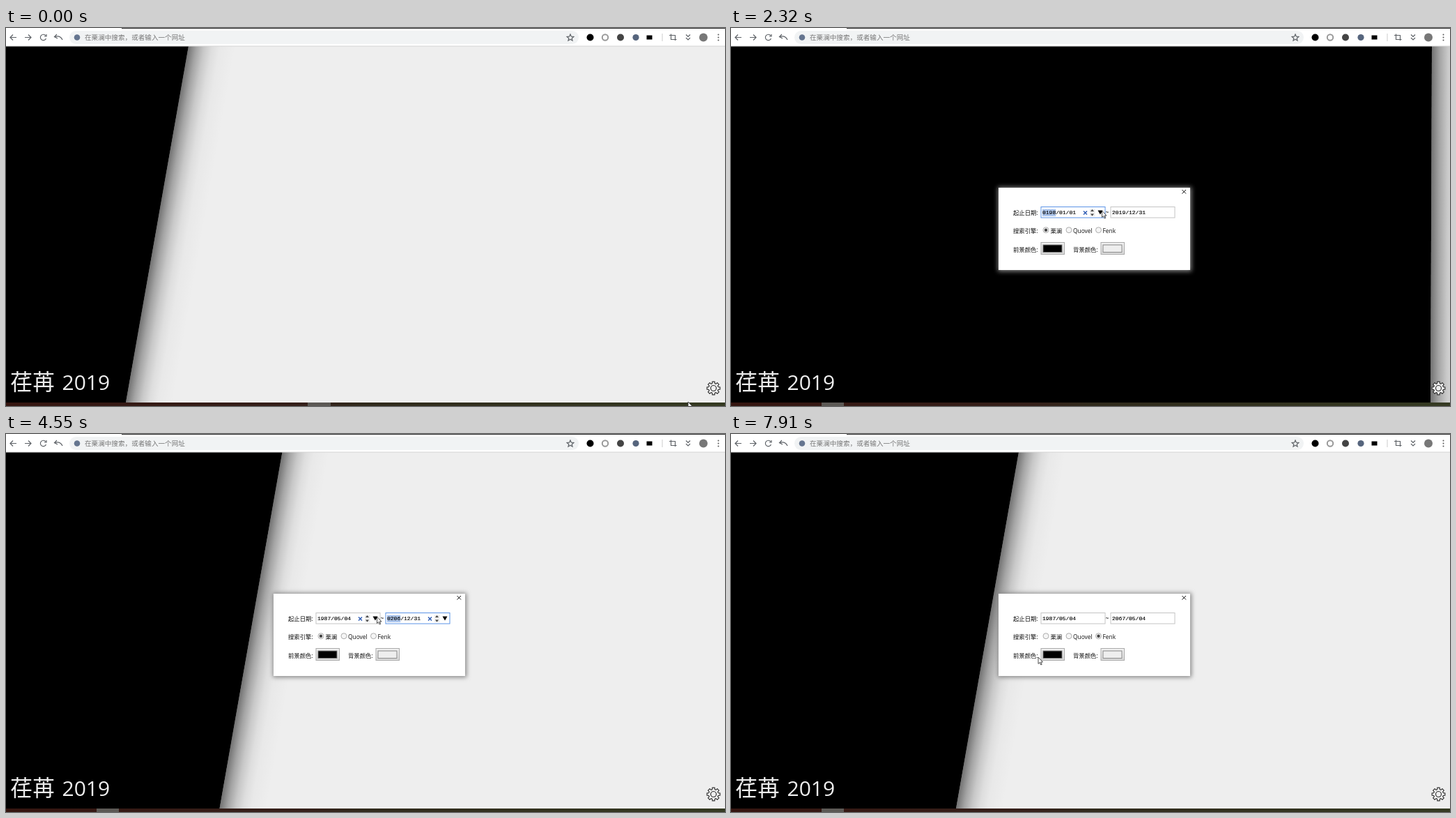
Recreate the animation shown at these times as an HTML page. Size 1032 px wide and 542 px high, loop 7990 ms.

```html
<!DOCTYPE html>
<html lang="zh">
<head>
<meta charset="utf-8">
<style>
  html, body { margin: 0; width: 100%; height: 100%; overflow: hidden; background: #eee; }
  svg { display: block; width: 1032px; height: 542px; }
  text { font-family: "Open Sans", "Noto Sans CJK SC", "Noto Sans CJK", sans-serif; white-space: pre; }
  .label { font-size: 8.4px; font-weight: 500; fill: #111; }
  .date { font: 8px "Liberation Mono", monospace; fill: #000; stroke: #000; stroke-width: .15; }
  .icon { fill: none; stroke: #5f6368; stroke-width: 1.2; }
</style>
</head>
<body>
<svg viewBox="0 0 1032 542">
  <defs>
    <linearGradient id="shade">
      <stop offset="0" stop-opacity=".52"/><stop offset=".167" stop-opacity=".31"/>
      <stop offset=".333" stop-opacity=".16"/><stop offset=".5" stop-opacity=".067"/>
      <stop offset=".667" stop-opacity=".023"/><stop offset="1" stop-opacity="0"/>
    </linearGradient>
    <linearGradient id="task">
      <stop stop-color="#351510"/><stop offset=".42" stop-color="#35201a"/>
      <stop offset=".5" stop-color="#302a1c"/><stop offset="1" stop-color="#353a22"/>
    </linearGradient>
    <linearGradient id="button" x2="0" y2="1">
      <stop stop-color="#f2f2f2"/><stop offset="1" stop-color="#d9d9d9"/>
    </linearGradient>
    <filter id="blur" x="-20%" y="-20%" width="140%" height="140%"><feGaussianBlur stdDeviation="3"/></filter>
  </defs>

  <rect width="1032" height="542" fill="#eee"/>
  <g id="panel">
    <rect x="-1300" width="1300" height="511"/>
    <rect width="68" height="511" fill="url(#shade)"/>
  </g>
  <text x="6" y="519" font-size="32" fill="#eee">荏苒</text>
  <text x="80.500" y="519" font-size="30" fill="#eee">2019</text>
  <path id="gear" fill="#f4f4f4" stroke="#333" stroke-width="1.2" stroke-linejoin="round"/>
  <circle cx="1015.500" cy="516.500" r="4" fill="#eee" stroke="#333" stroke-width="1.200"/>

  <g id="toolbar">
    <rect width="1032" height="26" fill="#fff"/>
    <path d="M166 .5H1032" stroke="#333"/>
    <path d="M0 26H1032" stroke="#d4d4d4"/>
    <rect x="91" y="4" width="731" height="19" rx="9.500" fill="#f1f3f4"/>
    <path class="icon" d="M15 13.500H6M10 9.500L6 13.500L10 17.500M27 13.500H36M32 9.500L36 13.500L32 17.500M57 11A4.200 4.200 0 1 0 57.500 15M58 9V12H55M70 12.500Q78 10 81 17M73 9L69.500 12.500L74 15"/>
    <circle cx="102" cy="13.500" r="4.300" fill="#65758f"/>
    <text x="113" y="17" font-size="9.600" fill="#777">在栗澜中搜索，或者输入一个网址</text>
    <path class="icon" stroke-width="1" d="M810 9L811.400 12.200L814.800 12.500L812.200 14.700L813 18L810 16.200L807 18L807.800 14.700L805.200 12.500L808.600 12.200Z"/>
    <circle cx="838.500" cy="13.500" r="5"/>
    <circle cx="860" cy="13.500" r="4.200" fill="none" stroke="#999" stroke-width="2"/>
    <circle cx="882" cy="13.500" r="5" fill="#444"/>
    <circle cx="904" cy="13.500" r="4.600" fill="#56657d"/>
    <rect x="919.500" y="10.500" width="8" height="6"/>
    <path d="M942 8V19" stroke="#ccc"/>
    <path class="icon" d="M952 10.500H960.500V18M954.500 8.500V16.500H962.500M976 9.500L979 12.500L982 9.500M976 14L979 17L982 14"/>
    <circle cx="1001" cy="13.500" r="6" fill="#777"/>
    <path d="M1022.500 9.500v.1m0 3.900v.1m0 3.900v.1" stroke="#555" stroke-width="2" stroke-linecap="round"/>
  </g>

  <rect y="537" width="1032" height="5" fill="url(#task)"/>
  <rect id="task-tab" y="537" height="5" fill="#5c5955"/>
  <text x="966" y="546.500" font-size="8" fill="#fff">18:41</text>

  <g id="dialog">
    <rect x="383" y="228" width="278" height="121" fill="#858585" filter="url(#blur)"/>
    <rect x="384" y="229" width="275" height="118" fill="#fff"/>
    <path d="M647.500 232l5.500 5.500m0-5.500l-5.500 5.500" stroke="#111"/>
    <g class="label">
      <text x="405" y="267.500">起止日期:</text><text x="537.500" y="267">~</text>
      <text x="405" y="294">搜索引擎:</text>
      <text x="458.500" y="294">栗澜</text><text x="491" y="294">Quovel</text><text x="533.500" y="294">Fenk</text>
      <text x="405" y="320.500">前景颜色:</text><text x="491" y="320.500">背景颜色:</text>
    </g>
    <g id="fields"></g>
    <g fill="#f5f5f5" stroke="#999" stroke-width=".8">
      <circle cx="452" cy="289.700" r="4"/><circle cx="485" cy="289.700" r="4"/><circle cx="527.500" cy="289.700" r="4"/>
    </g>
    <circle id="choice" cy="289.700" r="2.200" fill="#444"/>
    <g stroke="#aaa">
      <rect x="445" y="307.500" width="33.500" height="17" fill="url(#button)"/>
      <rect x="531" y="307.500" width="33.500" height="17" fill="url(#button)"/>
      <rect x="448" y="311" width="27" height="10.500" fill="#000" stroke="#777"/>
      <rect x="534" y="311" width="27" height="10.500" fill="#eee" stroke="#888"/>
    </g>
  </g>
  <path id="cursor" d="M0 0V9.500L2.200 7.500L3.800 11L5.200 10.400L3.700 7H6.500Z" fill="#fff" stroke="#222" stroke-width=".8"/>
</svg>
<script>
const LOOP = 7990, OPEN = 450, CLICK = 6900;
const $ = id => document.getElementById(id);
const set = (el, attrs) => { for (const k in attrs) el.setAttribute(k, attrs[k]); };
const show = (el, on) => set(el, { visibility: on ? 'inherit' : 'hidden' });

// Top x of the panel's slanted edge: [time, x]
const edgeKeys = [[0, 262], [1720, 262], [1850, 974], [2150, 1006], [2600, 1006], [2850, 988], [3870, 988],
  [3960, 732], [4170, 732], [4600, 384], [4980, 386], [5120, 410], [5600, 410], [5800, 405], [5840, 405], [6200, 413]];
const cursorKeys = [[0, 979, 536], [70, 979, 536], [350, 1014, 515], [500, 1014, 515], [830, 632, 320], [1150, 532.5, 262],
  [6050, 532.5, 262], [6600, 526, 288], [7200, 525, 290], [7520, 521, 296], [7870, 441, 320]];
// Typing: [time, start date, end date, focused field, selected part]
const edits = [
  [0, '2019/01/01', '2019/12/31', -1, 0],
  [1200, '2019/01/01', '2019/12/31', 0, 0],
  [1770, '0001/01/01', '2019/12/31', 0, 0],
  [2000, '0019/01/01', '2019/12/31', 0, 0],
  [2200, '0198/01/01', '2019/12/31', 0, 0],
  [2400, '1987/01/01', '2019/12/31', 0, 1],
  [2570, '1987/00/01', '2019/12/31', 0, 1],
  [2760, '1987/05/01', '2019/12/31', 0, 2],
  [3120, '1987/05/00', '2019/12/31', 0, 2],
  [3370, '1987/05/04', '2019/12/31', 0, 2],
  [3650, '1987/05/04', '2019/12/31', 1, 0],
  [3880, '1987/05/04', '0002/12/31', 1, 0],
  [4220, '1987/05/04', '0020/12/31', 1, 0],
  [4400, '1987/05/04', '0206/12/31', 1, 0],
  [4600, '1987/05/04', '2067/12/31', 1, 1],
  [5050, '1987/05/04', '2067/00/31', 1, 1],
  [5320, '1987/05/04', '2067/05/31', 1, 2],
  [5600, '1987/05/04', '2067/05/00', 1, 2],
  [5800, '1987/05/04', '2067/05/04', 1, 2],
  [CLICK, '1987/05/04', '2067/05/04', -1, 0]
];

function tween(keys, t) {
  const i = keys.findIndex(k => k[0] > t);
  if (i < 0) return keys[keys.length - 1].slice(1);
  const a = keys[i - 1], b = keys[i], u = (t - a[0]) / (b[0] - a[0]), e = u * u * (3 - 2 * u);
  return a.slice(1).map((v, j) => v + (b[j + 1] - v) * e);
}

$('fields').innerHTML = [0, 100].map(dx => `<g transform="translate(${dx})">
  <rect x="445" y="256.500" width="92" height="15.500" fill="#fff"/>
  <rect y="259.500" height="10.500" fill="#adc6ec"/>
  <text class="date" x="447" y="267.300"></text>
  <g><path d="M506 262.500l5 5m0-5l-5 5" stroke="#2f5db5" stroke-width="1.500"/>
    <rect x="515" y="259" width="7.500" height="11" fill="#eee"/>
    <path d="M516 263l2.500-3l2.500 3zm0 3.500h5l-2.500 3z" fill="#444"/>
    <path d="M526.500 261.500h7l-3.500 6z"/></g></g>`).join('');
const fields = [...$('fields').children].map(g => {
  const [box, mark, text, tools] = g.children;
  return { box, mark, text, tools };
});

const gearPoints = [];
for (let i = 0; i < 8; i++)
  for (const [offset, r] of [[-.27, 7], [-.18, 9.5], [.18, 9.5], [.27, 7]]) {
    const a = i * Math.PI / 4 + offset;
    gearPoints.push((1015.5 + r * Math.cos(a)).toFixed(2) + ' ' + (516.5 + r * Math.sin(a)).toFixed(2));
  }
set($('gear'), { d: 'M' + gearPoints.join('L') + 'Z' });

function draw(t) {
  const [x] = tween(edgeKeys, t);
  const slant = Math.max(0, Math.min(90, 1008 - x));   // the edge straightens near the right side
  set($('panel'), { transform: `matrix(1 0 ${-slant / 511} 1 ${x} 26)` });

  const opened = t >= OPEN;
  show($('dialog'), opened);
  set($('task-tab'), { x: opened ? 130 : 433, width: opened ? 32 : 33 });
  set($('choice'), { cx: t < CLICK ? 452 : 527.5 });

  const [cx, cy] = tween(cursorKeys, t);
  set($('cursor'), { transform: `translate(${cx} ${cy})` });
  const hovered = cx > 445 && cx < 537 && cy > 256 && cy < 272;

  const [, start, end, focus, part] = edits.filter(e => e[0] <= t).pop();
  fields.forEach((f, i) => {
    const active = focus === i;
    f.text.textContent = i ? end : start;
    set(f.box, { stroke: active ? '#5b93e6' : '#c4c4c4' });
    set(f.mark, { x: 447 + [0, 24, 38.4][part], width: part ? 9.6 : 19.2 });
    show(f.mark, active);
    show(f.tools, active || (i === 0 && hovered));
  });
}

const origin = performance.now();
function tick() {
  draw((performance.now() - origin) % LOOP);
  requestAnimationFrame(tick);
}
tick();
</script>
</body>
</html>
```
